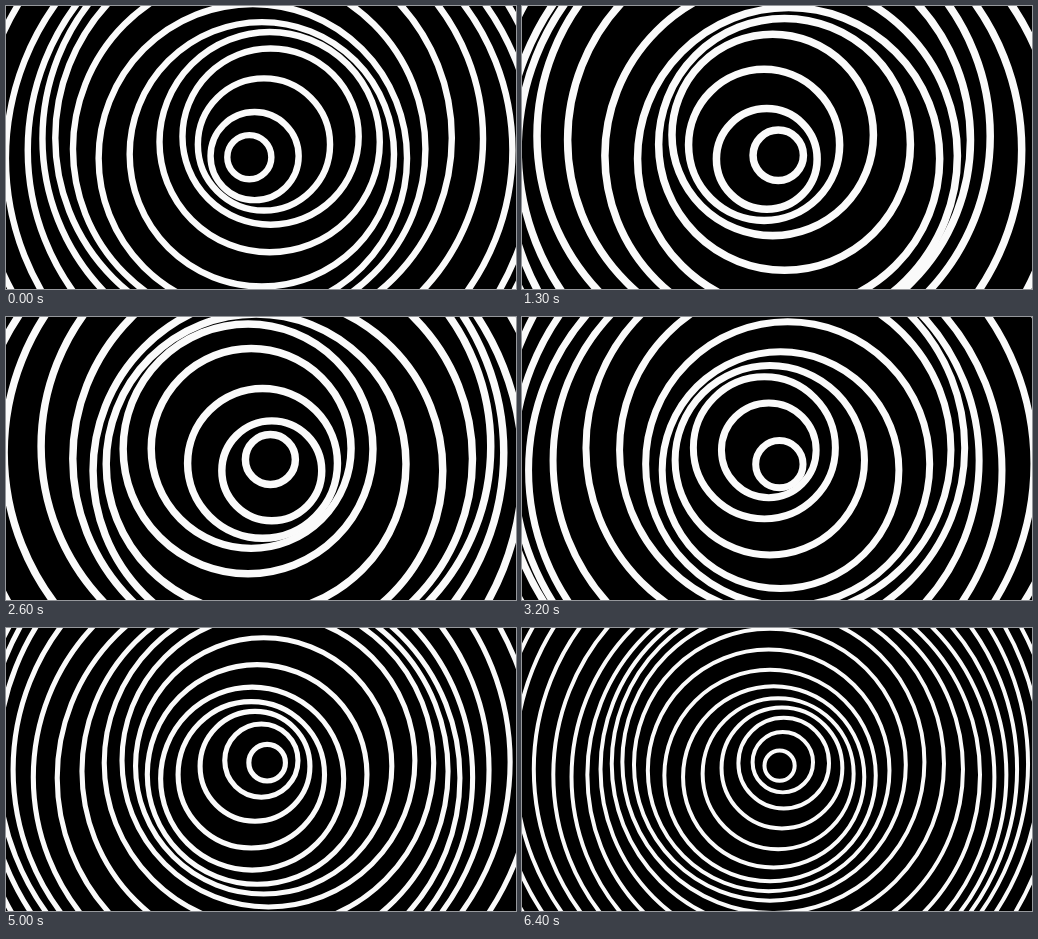
An HTML page with a canvas for the animation above (6.5 s loop, 510 by 283 pixels).

```html
<!DOCTYPE html>
<html lang="en">
<head>
<meta charset="utf-8">
<title>Wobbling rings</title>
<style>
  html, body { margin: 0; width: 100%; height: 100%; overflow: hidden; background: #000; }
  canvas { display: block; width: 100vw; height: 100vh; }
</style>
</head>
<body>
<canvas id="stage" width="510" height="283"></canvas>
<script>
const ctx = document.getElementById('stage').getContext('2d');
const WIDTH = 510, HEIGHT = 283;
const CENTER = { x: 254.2, y: 141.5 };
const LOOP = 6500, STEP = 100, MAX_RADIUS = 330;

// Distance between neighbouring rings: the ring count across the stage swings slowly.
const spacingAt = t => WIDTH / (29.645 - 9.717 * Math.cos(0.445 * (t - 1.885)));

function draw(t) {
  const spacing = spacingAt(t);
  const sway = spacing / 2;
  ctx.fillStyle = '#000';
  ctx.fillRect(0, 0, WIDTH, HEIGHT);
  ctx.strokeStyle = '#fafafa';
  ctx.lineWidth = 0.35 * spacing - 1.3;

  for (let r = spacing; r < MAX_RADIUS; r += spacing) {
    const x = CENTER.x + sway * Math.sin(0.04 * r + 3.282 * t - 2.295);
    const y = CENTER.y + sway * Math.sin(0.0533 * r + 4.39 * t - 0.1);
    ctx.beginPath();
    ctx.arc(x, y, r, 0, 2 * Math.PI);
    ctx.stroke();
  }
}

function tick() {
  const ms = performance.now() % LOOP;
  draw(Math.floor(ms / STEP) * STEP / 1000);
  requestAnimationFrame(tick);
}
tick();
</script>
</body>
</html>
```
